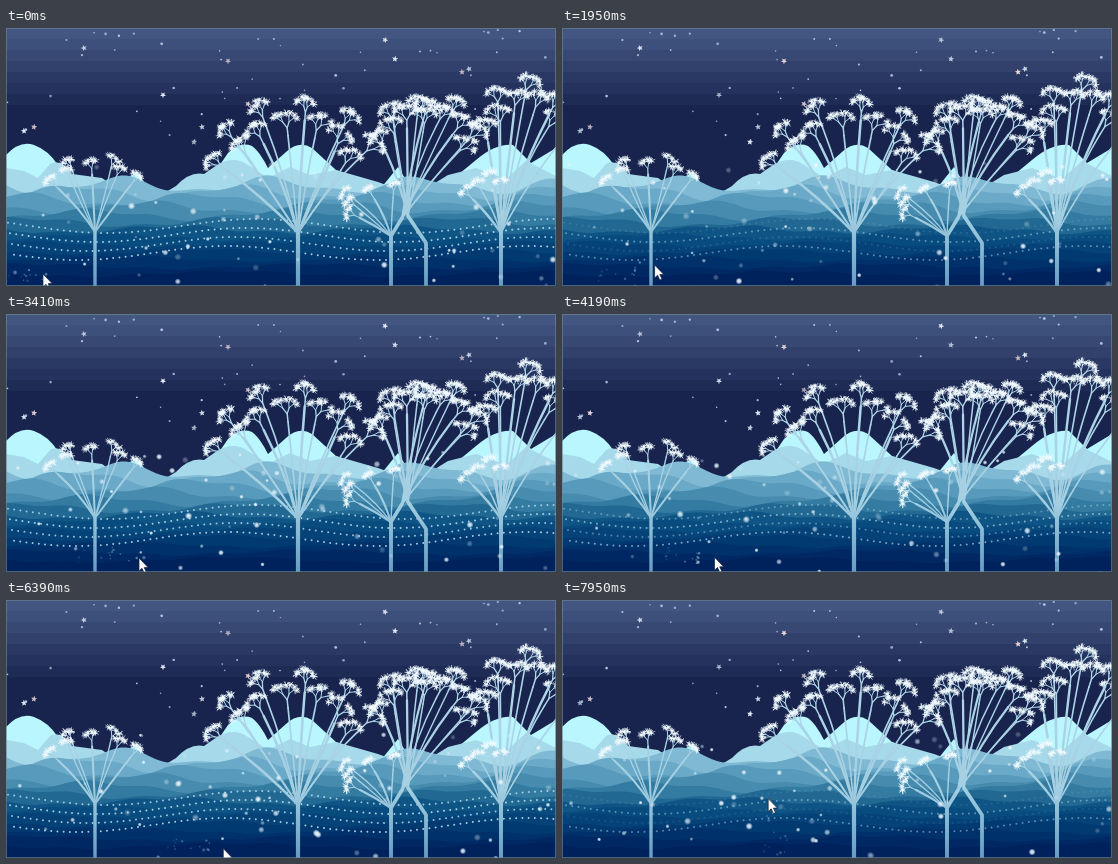
Recreate the animation shown at these times as an HTML page. Size 550 by 258 pixels, loop 8 s.

```html
<!DOCTYPE html>
<html lang="en">
<head>
<meta charset="utf-8">
<title>Winter night</title>
<style>
html, body { margin: 0; width: 100%; height: 100%; overflow: hidden; background: #18244e; }
svg { display: block; width: 100vw; height: 100vh; }
</style>
</head>
<body>
<svg id="stage" viewBox="0 0 550 258" preserveAspectRatio="none">
  <defs>
    <radialGradient id="flake">
      <stop offset="0" stop-color="#fff"/>
      <stop offset=".45" stop-color="#e3f1fb" stop-opacity=".85"/>
      <stop offset="1" stop-color="#cfe6f6" stop-opacity="0"/>
    </radialGradient>
    <linearGradient id="bark" gradientUnits="userSpaceOnUse" x1="0" y1="80" x2="0" y2="258">
      <stop offset="0" stop-color="#b0d6e8"/>
      <stop offset=".6" stop-color="#a5d0e2"/>
      <stop offset="1" stop-color="#659dc2"/>
    </linearGradient>
  </defs>
</svg>
<script>
const LOOP = 8000;
const STEP = LOOP / 61;
const stage = document.getElementById('stage');

function add(tag, attrs, parent = stage) {
  const el = document.createElementNS('http://www.w3.org/2000/svg', tag);
  for (const key in attrs) el.setAttribute(key, attrs[key]);
  return parent.appendChild(el);
}

function seeded(seed) {
  return () => {
    seed = (seed * 1664525 + 1013904223) >>> 0;
    return seed / 4294967296;
  };
}

const n = value => Number(value).toFixed(1);
const mix = (a, b, k) => a.map((v, i) => v + (b[i] - v) * k);
const rgb = color => `rgb(${color.map(Math.round)})`;

// Piecewise linear value of [position, values] keys.
function along(keys, at) {
  const i = Math.max(1, keys.findIndex(key => key[0] >= at));
  const [from, a] = keys[i - 1], [to, b] = keys[i];
  return mix(a, b, (at - from) / (to - from));
}

function drawSky() {
  for (let i = 0; i < 9; i++) {
    const fill = rgb(mix([67, 86, 130], [24, 36, 78], Math.min(1, i / 7)));
    add('rect', { x: 0, y: i * 11, width: 550, height: 258 - i * 11, fill });
  }
}

function starPath(x, y, turn) {
  let d = '';
  for (let k = 0; k < 10; k++) {
    const r = k % 2 ? 1.4 : 3.2, a = k * Math.PI / 5 + turn;
    d += `${k ? 'L' : 'M'}${n(x + r * Math.cos(a))} ${n(y + r * Math.sin(a))}`;
  }
  return d + 'Z';
}

const stars = [];
function drawStars() {
  const random = seeded(5);
  const bright = '28,99 18,103 78,20 222,33 379,12 389,31 456,44 463,41 157,67 242,76 188,114 196,99';
  bright.split(' ').forEach((point, i) => {
    const [x, y] = point.split(',').map(Number);
    stars.push(add('path', { d: starPath(x, y, i - 1.4), fill: i % 3 ? '#e4ebf8' : '#eed9db' }));
  });
  for (let i = 0; i < 48; i++) {
    stars.push(add('circle', {
      cx: n(random() * 550), cy: n(random() ** 1.3 * 125), r: n(.7 + random() * .7), fill: '#b9c7e2'
    }));
  }
}

const depthColors = [[120, [175, 219, 234]], [150, [158, 208, 226]], [165, [112, 174, 203]], [185, [64, 134, 170]],
  [205, [12, 84, 132]], [228, [0, 55, 112]], [260, [0, 22, 82]]];

function drawHills() {
  const hill = (d, fill) => add('path', { d: d + 'V258H0Z', fill });
  hill('M0 127Q14 112 28 117Q42 122 52 137L69 151L110 176L124 149Q130 141 135 150L153 175L205 150' +
    'L222 125Q234 113 246 118Q254 124 262 140L280 124Q293 112 306 120L330 142L375 160L392 139' +
    'L408 165H430L470 132Q490 115 507 117L525 135L550 120', '#b9f6fe');
  hill('M0 140L18 143L32 150L44 136Q54 130 66 146L96 150L122 168L136 180L150 170L170 158' +
    'Q184 143 198 146L211 137Q228 127 242 137L262 150L284 139L304 147L330 142L372 154L394 162' +
    'L416 163L442 147L470 140L500 151L520 133L550 148', rgb([166, 217, 233]));
  for (let i = 0; i < 13; i++) {
    const base = 157 + i * 7.4;
    const amp = 7 - Math.min(4.5, i * .6);
    let d = '';
    for (let x = 0; x <= 550; x += 5) {
      const y = base + amp * Math.sin(x / (24 + i * 2) + i * 2.1) + amp * .4 * Math.sin(x / 11 + i);
      d += `${x ? 'L' : 'M'}${x} ${n(y)}`;
    }
    hill(d, rgb(along(depthColors, base + 3)));
  }
}

const dotRows = [];
function drawDots() {
  for (let row = 0; row < 4; row++) {
    let d = '';
    for (let x = 2 + row * 2; x < 550; x += 6.2) {
      const y = 198 + row * 9 + 7 * Math.cos((x - 100) * Math.PI / 150 + row * .2);
      d += `M${n(x)} ${n(y)}h.01`;
    }
    dotRows.push(add('path', { d, stroke: '#c3e4f4', 'stroke-width': 2, 'stroke-linecap': 'round' }));
  }
}

// Limbs fan out from the fork to an elliptical crown; twigs and blossom grow at their ends.
const trees = [
  { x: 89, fork: [89, 204], crown: [88, 158, 36, 17], fan: [-3.3, 0], limbs: 7, twig: 6, width: 3.4 },
  { x: 292, fork: [292, 205], crown: [289, 140, 68, 48], fan: [-3.2, .05], limbs: 12, twig: 8, width: 4.2 },
  { x: 385, fork: [385, 208], crown: [372, 180, 28, 13], fan: [-4, -1], limbs: 5, twig: 6, width: 3.6 },
  { x: 385, fork: [396, 190], crown: [432, 120, 26, 32], fan: [-2.2, .4], limbs: 6, twig: 8, width: 3.6, joint: 208 },
  { x: 420, fork: [402, 188], crown: [406, 120, 26, 30], fan: [-3.3, -.9], limbs: 6, twig: 8, width: 3.8, joint: 215 },
  { x: 495, fork: [495, 205], crown: [516, 112, 34, 42], fan: [-3.2, .2], limbs: 9, twig: 8, width: 4 },
  { x: 495, fork: [495, 205], crown: [485, 172, 18, 14], fan: [-3.1, -.7], limbs: 4, twig: 6, width: 4 }
];

function drawTrees() {
  const random = seeded(77);
  let blossom = '';

  function burst(x, y) {
    for (let k = 0; k < 8; k++) {
      const a = k * .785 + random(), r = 1.6 + random() * 2.4;
      blossom += `M${n(x)} ${n(y)}l${n(r * Math.cos(a))} ${n(r * Math.sin(a))}`;
    }
  }

  function grow(x, y, angle, length, depth, twigs) {
    if (!depth) return burst(x, y);
    const nx = x + length * Math.cos(angle), ny = y + length * Math.sin(angle);
    twigs[depth] = (twigs[depth] || '') + `M${n(x)} ${n(y)}L${n(nx)} ${n(ny)}`;
    for (const side of [-1, 1]) {
      grow(nx, ny, angle + side * (.25 + random() * .4), length * (.7 + random() * .2), depth - 1, twigs);
    }
  }

  for (const { x, fork: [fx, fy], crown: [cx, cy, rx, ry], fan, limbs, twig, width, joint = fy } of trees) {
    const group = add('g', { fill: 'none', stroke: 'url(#bark)', 'stroke-linecap': 'round', 'stroke-linejoin': 'round' });
    const twigs = [];
    add('path', { d: `M${x} 258V${joint}L${fx} ${fy}`, 'stroke-width': width }, group);
    for (let i = 0; i < limbs; i++) {
      const a = fan[0] + (fan[1] - fan[0]) * i / (limbs - 1);
      const reach = i % 2 ? .68 : 1;
      const ex = cx + rx * reach * Math.cos(a), ey = cy + ry * reach * Math.sin(a);
      const bx = fx + (ex - fx) * (.35 + random() * .25), by = fy + (ey - fy) * .55;
      add('path', {
        d: `M${fx} ${fy}Q${n(bx)} ${n(by)} ${n(ex)} ${n(ey)}`, 'stroke-width': width * (i % 3 ? .4 : .6)
      }, group);
      grow(ex, ey, Math.atan2(ey - by, ex - bx), twig, twig > 6 ? 4 : 3, twigs);
    }
    twigs.forEach((d, depth) => add('path', { d, 'stroke-width': .5 + depth * .25 }, group));
  }
  add('path', { d: blossom, fill: 'none', stroke: '#f1faff', 'stroke-width': .8, 'stroke-linecap': 'round', opacity: .78 });
}

const snow = [];
function makeSnow() {
  const random = seeded(2024);
  for (let i = 0; i < 56; i++) {
    snow.push({
      x: random() * 550, y: random() * 128, speed: 5 + random() * 9, phase: random() * 6.3,
      el: add('circle', { r: n(1.8 + random() * 2.2), fill: 'url(#flake)' })
    });
  }
}

const cursorPath = [[-2500, [2, 246]], [0, [37, 246]], [900, [65, 244]], [1950, [96, 236]], [3410, [133, 244]],
  [5090, [183, 242]], [6390, [220, 249]], [LOOP, [205, 194]]];

drawSky();
drawStars();
drawHills();
drawDots();
drawTrees();
makeSnow();

const trail = Array.from({ length: 16 }, (_, i) => add('circle', { r: i % 3 ? .8 : 1.2, fill: '#7fa9d2' }));
const pointer = add('path', {
  d: 'M0 0V13L3 10.3L5.2 15L7.3 14L5.2 9.6H9.2Z', fill: '#fff', stroke: '#172038', 'stroke-width': .7
});
add('rect', { x: .5, y: .5, width: 549, height: 257, fill: 'none', stroke: '#6c8793', opacity: .65 });

function place(el, x, y, opacity) {
  el.setAttribute('cx', n(x));
  el.setAttribute('cy', n(y));
  el.setAttribute('opacity', Math.max(0, opacity).toFixed(2));
}

function render(time) {
  const s = time / 1000;
  const glow = .5 + .5 * Math.cos(s * 2 * Math.PI / 3.2);
  dotRows.forEach((row, i) => row.setAttribute('opacity', (i % 2 ? .45 + .4 * glow : .1 + .7 * glow).toFixed(2)));
  stars.forEach((star, i) => star.setAttribute('opacity', (.85 + .15 * Math.sin(s * 2 + i * 1.7)).toFixed(2)));
  for (const { x, y, speed, phase, el } of snow) {
    place(el, x + 4 * Math.sin(s * .8 + phase), 134 + (y + speed * s) % 128, .6 + .35 * Math.sin(s * 1.5 + phase));
  }
  trail.forEach((dot, i) => {
    const birth = (Math.floor(time / 140) - 2 - i) * 140;
    const age = (time - birth) / 2500;
    const [x, y] = along(cursorPath, Math.max(-2500, birth));
    place(dot, x + 7 * Math.sin(birth * 1.7), y + 5 * Math.sin(birth * 2.3) + age * 3, .75 * (1 - age));
  });
  pointer.setAttribute('transform', `translate(${along(cursorPath, time).map(n)})`);
}

const begin = performance.now();
function tick() {
  const time = (performance.now() - begin) % LOOP;
  render(Math.floor(time / STEP) * STEP);
  requestAnimationFrame(tick);
}
tick();
</script>
</body>
</html>
```
